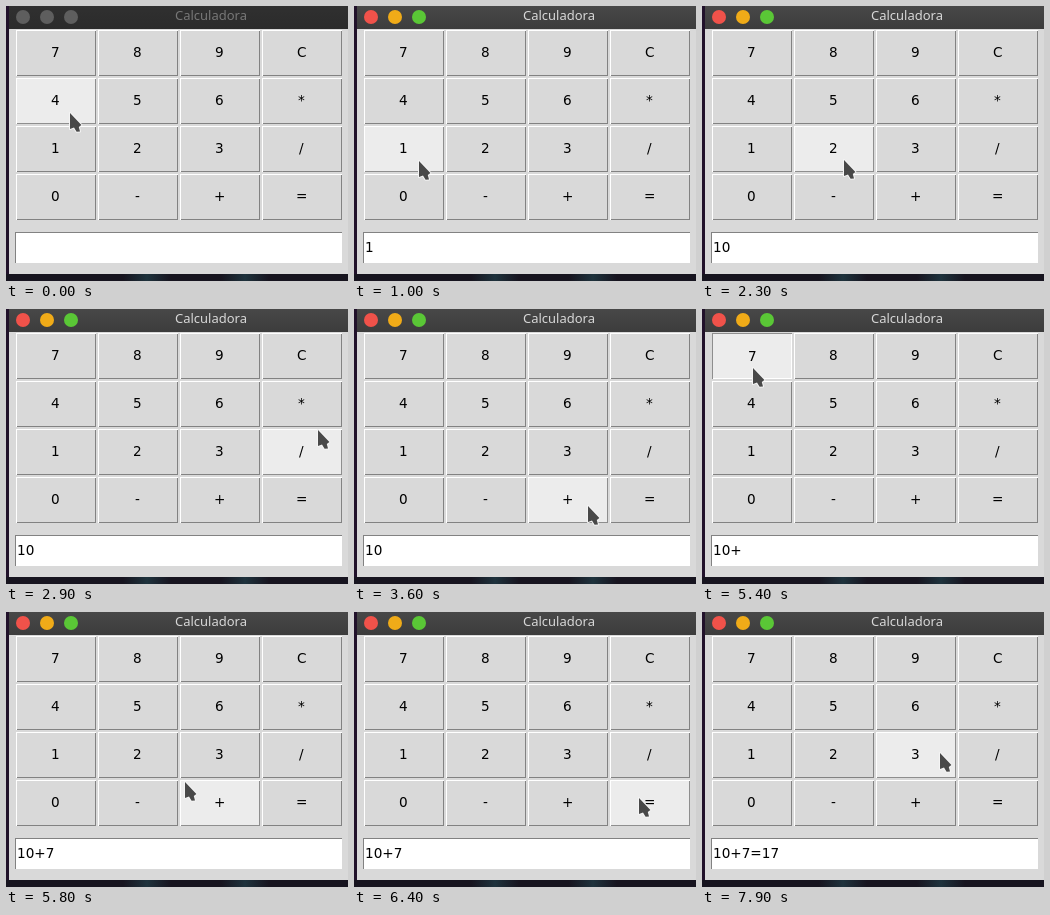
Write an HTML page with a canvas that moves like this. It is 342 px wide and 275 px high and loops after 8000 ms.

```html
<!DOCTYPE html>
<html lang="es">
<head>
<meta charset="utf-8">
<title>Calculadora</title>
<style>
  html, body { margin: 0; width: 100%; height: 100%; overflow: hidden; background: #d9d9d9; }
  canvas { display: block; }
</style>
</head>
<body>
<canvas id="stage" width="342" height="275"></canvas>
<script>
const ctx = document.getElementById('stage').getContext('2d');
const LOOP = 8000, STEP = 100;
const KEYS = ['789C', '456*', '123/', '0-+='];
const BTN = { x: 10, y: 24, w: 80, h: 46, dx: 82, dy: 48 };
const FONT = '13.6px "DejaVu Sans", sans-serif';
const TAIL = new Path2D('M0 0V16L4 14.4L6.6 18.8L10 18.6L8.8 14L11.4 12Z');

// Pointer glides: each curves past "via" and slows down towards "to"
const HOME = [64, 107];
const GLIDES = [
  { at: 200, steps: 6, via: [60, 210], to: [65, 155] },
  { at: 1300, steps: 2, via: [65, 170], to: [64, 184] },
  { at: 2300, steps: 5, via: [170, 150], to: [290, 73] },
  { at: 2800, steps: 4, via: [316, 103], to: [312, 138] },
  { at: 3200, steps: 7, via: [295, 200], to: [222, 197] },
  { at: 4300, steps: 7, via: [141, 178], to: [51, 59] },
  { at: 5700, steps: 8, via: [220, 235], to: [285, 186] },
  { at: 7700, steps: 3, via: [265, 165], to: [238, 141] }
];
// Each press lasts one step; its text shows on release
const PRESSES = [[900, '1'], [1800, '0'], [3900, '+'], [5400, '7'], [6800, '=17']];
const FOCUS_AT = PRESSES[0][0];

const easeOut = u => 1 - (1 - u) ** 2;
const bezier = (a, b, c, s) => (1 - s) ** 2 * a + 2 * s * (1 - s) * b + s * s * c;

function pointerAt(t) {
  let from = HOME, pos = HOME;
  for (const { at, steps, via, to } of GLIDES) {
    if (t < at) break;
    const s = easeOut(Math.min(1, ((t - at) / STEP + 1) / steps));
    pos = from.map((v, i) => Math.round(bezier(v, via[i], to[i], s)));
    from = to;
  }
  return pos;
}

function box(x, y, w, h, color) {
  ctx.fillStyle = color;
  ctx.fillRect(x, y, w, h);
}

function bevel(x, y, w, h, topLeft, bottomRight) {
  box(x, y, w, h, topLeft);
  box(x + 1, y + 1, w - 1, h - 1, bottomRight);
}

function desktop() {
  box(0, 0, 342, 275, '#21112a');
  box(0, 268, 342, 7, '#17141f');
  for (const x of [141, 239]) {
    const g = ctx.createLinearGradient(x - 24, 0, x + 24, 0);
    g.addColorStop(0, 'rgba(32,58,68,0)');
    g.addColorStop(.5, 'rgba(32,58,68,.8)');
    g.addColorStop(1, 'rgba(32,58,68,0)');
    box(x - 24, 268, 48, 7, g);
  }
}

function titleBar(focused) {
  const g = ctx.createLinearGradient(0, 0, 0, 23);
  g.addColorStop(0, focused ? '#484848' : '#303030');
  g.addColorStop(1, focused ? '#3c3c3c' : '#2b2b2b');
  box(3, 0, 339, 23, g);
  const dots = focused ? ['#f0524a', '#f0ab18', '#5ac736'] : Array(3).fill('#5e5e5e');
  dots.forEach((color, i) => {
    ctx.fillStyle = color;
    ctx.beginPath();
    ctx.arc(17 + i * 24, 11, 7, 0, Math.PI * 2);
    ctx.fill();
  });
  ctx.font = '13px "Noto Sans", sans-serif';
  ctx.textAlign = 'center';
  ctx.fillStyle = focused ? '#d8d8d8' : '#777';
  ctx.fillText('Calculadora', 205, 14);
}

function button(label, x, y, hover, down) {
  const shift = down ? 1 : 0;
  const dark = hover ? '#8e8e8e' : '#828282';
  const edges = down ? [dark, '#fff'] : ['#fff', dark];
  bevel(x, y, BTN.w, BTN.h, ...edges);
  box(x + 1, y + 1, BTN.w - 2, BTN.h - 2, hover ? '#ececec' : '#d9d9d9');
  ctx.fillStyle = '#000';
  const w = Math.round(ctx.measureText(label).width);
  ctx.fillText(label, Math.floor(x + BTN.w / 2 - w / 2) + shift, y + 27 + shift);
}

function entry(text) {
  bevel(9, 226, 327, 31, '#828282', '#fff');
  ctx.fillStyle = '#000';
  ctx.fillText(text, 11, 246);
}

function pointer(x, y) {
  ctx.save();
  ctx.translate(x, y);
  ctx.lineJoin = 'round';
  ctx.lineWidth = 2;
  ctx.strokeStyle = '#f4f4f4';
  ctx.stroke(TAIL);
  ctx.fillStyle = '#484848';
  ctx.fill(TAIL);
  ctx.restore();
}

function draw(t) {
  const [px, py] = pointerAt(t);
  const down = PRESSES.some(([at]) => at === t);
  const text = PRESSES.filter(([at]) => t > at).map(p => p[1]).join('');

  desktop();
  box(3, 23, 339, 245, '#d9d9d9');
  titleBar(t >= FOCUS_AT);
  ctx.font = FONT;
  ctx.textAlign = 'left';
  KEYS.forEach((row, r) => [...row].forEach((label, c) => {
    const x = BTN.x + c * BTN.dx, y = BTN.y + r * BTN.dy;
    const hover = px >= x && px < x + BTN.w && py >= y && py < y + BTN.h;
    button(label, x, y, hover, hover && down);
  }));
  entry(text);
  pointer(px, py);
}

const start = performance.now();
function tick() {
  const t = (performance.now() - start) % LOOP;
  draw(Math.floor(t / STEP) * STEP);
  requestAnimationFrame(tick);
}
tick();
</script>
</body>
</html>
```
